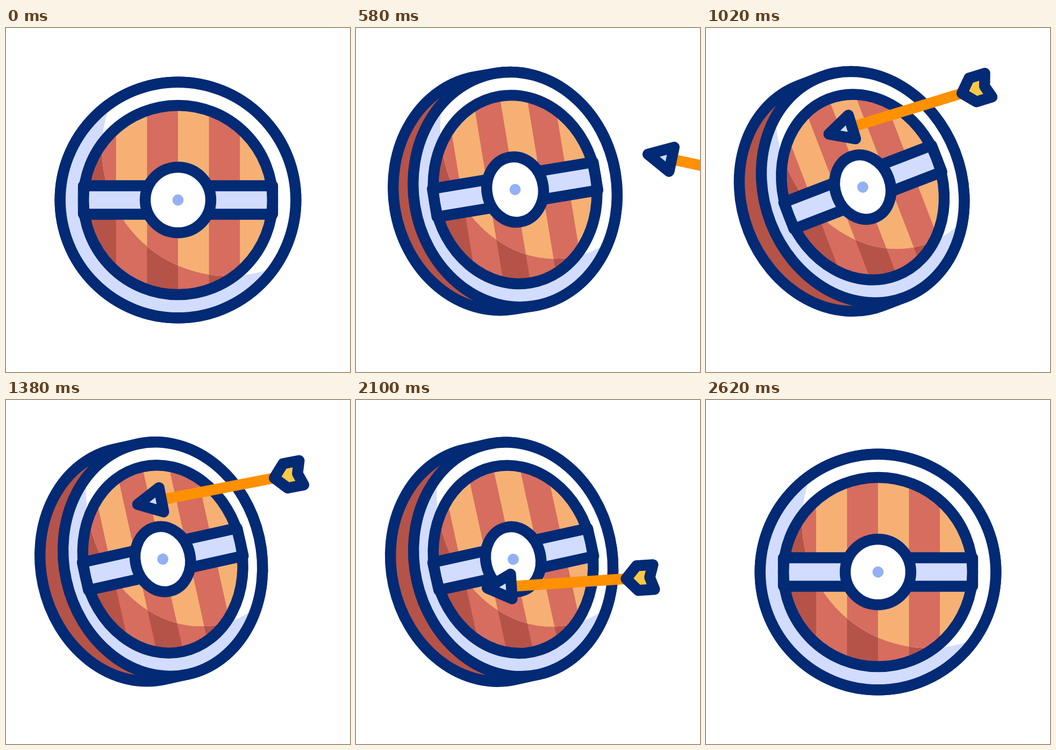
An HTML page with a canvas for the animation above (3 s loop, 640 by 640 pixels).

```html
<!DOCTYPE html>
<html lang="en">
<head>
<meta charset="utf-8">
<title>Shield and arrow</title>
<style>
  html, body { margin: 0; width: 100%; height: 100%; overflow: hidden; background: #fff; }
  canvas { display: block; }
</style>
</head>
<body>
<canvas id="stage" width="640" height="640"></canvas>
<script>
const ctx = document.getElementById('stage').getContext('2d');
const LOOP = 3000, TAU = Math.PI * 2, HALF = Math.PI / 2, DEG = Math.PI / 180;
const NAVY = '#022a75', LAVENDER = '#d2dcfe', RED = '#d66d5e', DARK = '#b55348';
const RIM = 219.3, RING = 176, HUB = 61, HIT = 800, DROP = 1820;

const mix = (a, b, k) => a + (b - a) * k;

// Symmetric ease in-out between two times
function ease(t, from, to, power = 2.5) {
  const k = Math.min(1, Math.max(0, (t - from) / (to - from)));
  return k < .5 ? (2 * k) ** power / 2 : 1 - (2 - 2 * k) ** power / 2;
}

function track(t, keys) {
  let value = keys[0][1];
  for (let i = 1; i < keys.length; i++)
    value += (keys[i][1] - keys[i - 1][1]) * ease(t, keys[i - 1][0], keys[i][0], 2);
  return value;
}

function paint(fill, stroke) {
  if (fill) { ctx.fillStyle = fill; ctx.fill(); }
  if (stroke) { ctx.strokeStyle = stroke; ctx.stroke(); }
}

function oval(r, squash, fill, stroke) {
  ctx.beginPath();
  ctx.ellipse(0, 0, r * squash, r, 0, 0, TAU);
  paint(fill, stroke);
}

function polygon(points, fill) {
  ctx.beginPath();
  points.forEach(([x, y]) => ctx.lineTo(x, y));
  ctx.closePath();
  paint(fill, NAVY);
}

function face(squash, rim, base, stripe) {
  oval(RIM, squash, rim);
  ctx.save();
  oval(RING, squash, base);
  ctx.clip();
  ctx.fillStyle = stripe;
  for (const x of [-115.2, 0, 115.2]) ctx.fillRect(x * squash, -RING, 57.6 * squash, 2 * RING);
  ctx.restore();
}

function shield(x, y, tilt, squash, depth) {
  ctx.save();
  ctx.translate(x, y);
  ctx.rotate(-tilt * DEG);

  ctx.beginPath();
  ctx.ellipse(-depth, 0, RIM * squash, RIM, 0, HALF, 3 * HALF);
  ctx.ellipse(0, 0, RIM * squash, RIM, 0, -HALF, HALF);
  ctx.closePath();
  paint(DARK, NAVY);

  face(squash, LAVENDER, DARK, RED);
  ctx.save();
  ctx.beginPath();
  ctx.ellipse(94 * squash, -94, 235.5 * squash, 235.5, 0, 0, TAU);
  ctx.clip();
  face(squash, '#fff', RED, '#f6b074');
  ctx.restore();

  ctx.beginPath();
  ctx.rect(-RING * squash, -26.5, 2 * RING * squash, 53);
  paint(LAVENDER, NAVY);
  oval(RING, squash, null, NAVY);
  oval(RIM, squash, null, NAVY);
  oval(HUB, squash, '#fff', NAVY);
  oval(10.4, 1, '#94b0f4');
  ctx.restore();
}

// Placed by the middle of the head's base; the shaft runs along +x
function arrow(x, y, angle) {
  ctx.save();
  ctx.translate(x, y);
  ctx.rotate(angle * DEG);
  ctx.fillStyle = '#ff9000';
  ctx.fillRect(4, -10, 208, 20);
  polygon([[-45, 0], [0, -23], [0, 23]], LAVENDER);
  polygon([[214, 0], [235, -23], [265.5, -23], [258, 0], [265.5, 23], [235, 23]], '#ffc845');
  ctx.restore();
}

function draw(t) {
  ctx.fillStyle = '#fff';
  ctx.fillRect(0, 0, 640, 640);
  ctx.lineWidth = 20.4;
  ctx.lineJoin = 'round';

  const turn = ease(t, 220, 740) - ease(t, 2080, 2600);
  const shift = ease(t, 220, 740) - ease(t, 2033, 2553);
  const lean = 12.5 * (ease(t, 220, 800) - ease(t, 2045, 2565));
  const kick = track(t, [[HIT, 0], [920, 10], [1300, 0]]);
  const depth = 44 * turn;
  const midX = mix(320, 270.2, shift), midY = mix(320, 300.8, shift);
  shield(midX + depth / 2 * Math.cos(lean * DEG), midY - depth / 2 * Math.sin(lean * DEG),
    lean + kick, 1 - .162 * turn, depth);

  if (t < HIT) {
    const k = (t - 580) / (HIT - 580);
    arrow(mix(588.5, 289, k), mix(244.5, 185.7, k), 12);
  } else if (t < DROP) {
    const c = Math.cos(kick * DEG), s = Math.sin(kick * DEG), dx = 18.8, dy = -115.1;
    arrow(270.2 + dx * c + dy * s, 300.8 - dx * s + dy * c,
      track(t, [[HIT, 12], [880, -22], [1250, -5], [1490, -15.1], [1540, -14]]));
  } else {
    const fall = ((t - DROP) / 480) ** 1.4;
    arrow(289, 185.7 + 341 * fall, -14 + 21.6 * fall);
  }
}

const start = performance.now();
function tick() {
  draw((performance.now() - start) % LOOP);
  requestAnimationFrame(tick);
}
tick();
</script>
</body>
</html>
```
